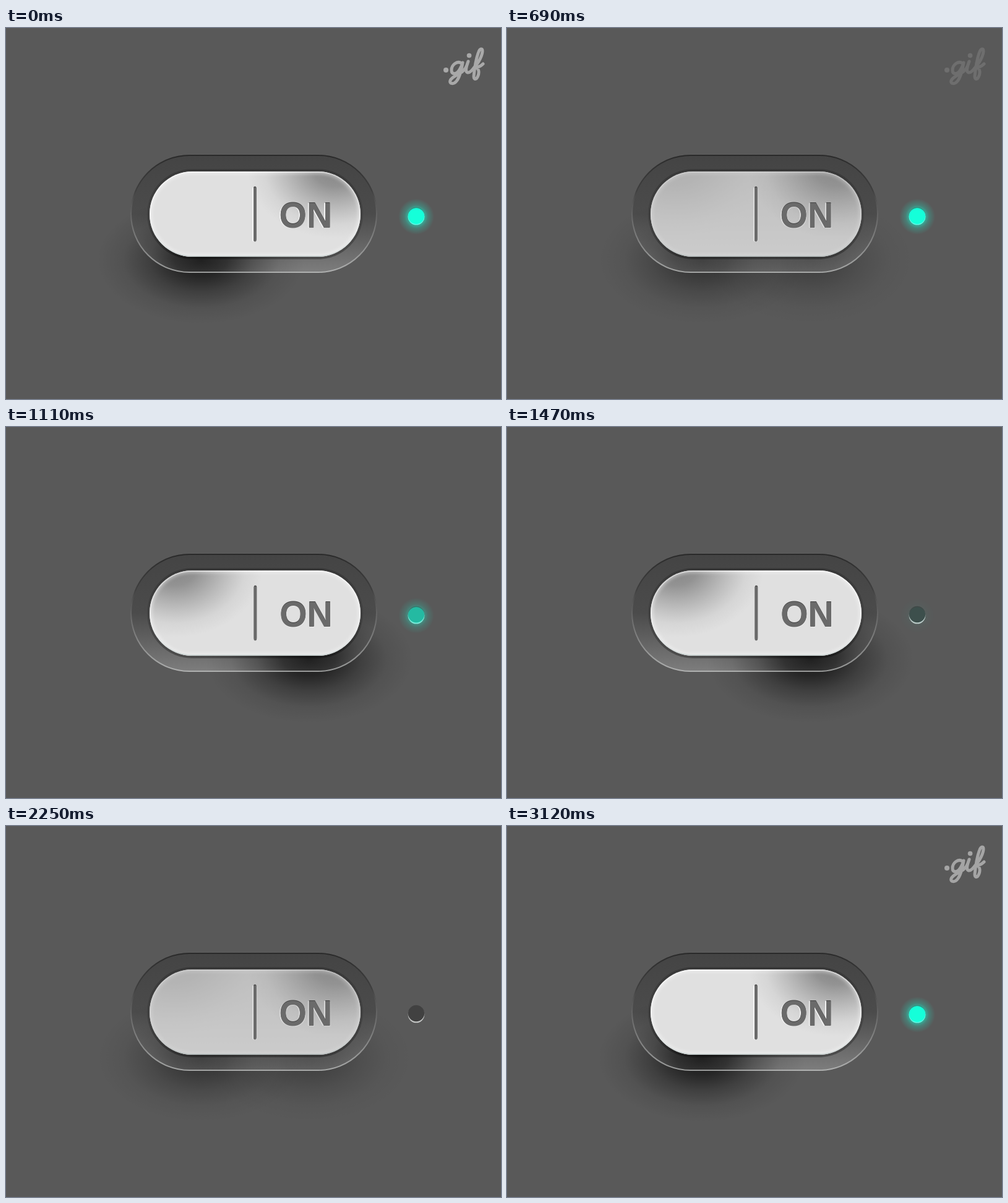
Animation of 800x600 px, one loop 3380 ms. Source, as an HTML page:

```html
<!DOCTYPE html>
<html lang="en">
<head>
<meta charset="utf-8">
<title>Switch</title>
<style>
  html, body { margin: 0; width: 100%; height: 100%; overflow: hidden; background: #595959; }
  svg { display: block; width: 800px; height: 600px; }
  text { font: bold 57px "Liberation Sans", Arial, sans-serif; }
  .script { fill: none; stroke: #fff; stroke-width: 5; stroke-linecap: round; stroke-linejoin: round; }
</style>
</head>
<body>
<svg viewBox="0 0 800 600">
  <defs>
    <linearGradient id="shelf" x2="0" y2="1">
      <stop offset="0" stop-color="#444"/>
      <stop offset=".5" stop-color="#4b4b4b"/>
      <stop offset=".72" stop-color="#606060"/>
      <stop offset="1" stop-color="#7e7e7e"/>
    </linearGradient>
    <linearGradient id="rim" x2="0" y2="1">
      <stop offset="0" stop-color="#2a2a2a"/>
      <stop offset=".3" stop-color="#383838" stop-opacity=".6"/>
      <stop offset=".5" stop-color="#888" stop-opacity=".4"/>
      <stop offset="1" stop-color="#c4c6c5" stop-opacity=".72"/>
    </linearGradient>
    <linearGradient id="well" x2="0" y2="1">
      <stop offset="0" stop-color="#383838"/>
      <stop offset="1" stop-color="#4c4c4c"/>
    </linearGradient>
    <linearGradient id="base" x2="0" y2="1">
      <stop offset="0" stop-color="#5a5a5a"/>
      <stop offset="1" stop-color="#8a8a8a"/>
    </linearGradient>
    <linearGradient id="bevel" x2="0" y2="1">
      <stop offset="0" stop-color="#fff" stop-opacity=".45"/>
      <stop offset=".5" stop-color="#fff" stop-opacity=".35"/>
      <stop offset="1" stop-color="#c6d0cf" stop-opacity=".8"/>
    </linearGradient>
    <radialGradient id="dark" gradientUnits="userSpaceOnUse" cx="0" cy="0" r="1"
      gradientTransform="translate(532 228) scale(142 112)">
      <stop offset="0" stop-color="#858585"/>
      <stop offset=".25" stop-color="#858585" stop-opacity=".85"/>
      <stop offset=".55" stop-color="#8a8a8a" stop-opacity=".45"/>
      <stop offset=".8" stop-color="#909090" stop-opacity=".13"/>
      <stop offset="1" stop-color="#909090" stop-opacity="0"/>
    </radialGradient>
    <radialGradient id="shade">
      <stop offset="0" stop-opacity=".72"/>
      <stop offset=".25" stop-opacity=".58"/>
      <stop offset=".5" stop-opacity=".29"/>
      <stop offset=".75" stop-opacity=".08"/>
      <stop offset="1" stop-opacity="0"/>
    </radialGradient>
    <radialGradient id="halo">
      <stop offset=".42" stop-color="#14ffd9" stop-opacity=".55"/>
      <stop offset=".65" stop-color="#14ffd9" stop-opacity=".22"/>
      <stop offset="1" stop-color="#14ffd9" stop-opacity="0"/>
    </radialGradient>
    <filter id="soft"><feGaussianBlur stdDeviation="2.5"/></filter>
    <clipPath id="pill"><rect x="232" y="232" width="341" height="138" rx="69"/></clipPath>
    <ellipse id="shadow" cx="315" cy="375" rx="168" ry="104" fill="url(#shade)"/>
    <g id="face" clip-path="url(#pill)">
      <rect x="232" y="232" width="341" height="138" fill="#e0e0e0"/>
      <rect x="232" y="232" width="341" height="138" fill="url(#dark)"/>
      <rect x="232" y="232" width="341" height="138" rx="69" fill="none"
        stroke="#fff" stroke-opacity=".4" stroke-width="8" filter="url(#soft)"/>
      <rect x="233" y="233" width="339" height="136" rx="68" fill="none"
        stroke="url(#bevel)" stroke-width="2"/>
    </g>
    <g id="marks">
      <rect x="400" y="257" width="4.6" height="88" rx="2.2"/>
      <text x="441.6" y="322.5">ON</text>
    </g>
  </defs>

  <rect width="800" height="600" fill="#595959"/>
  <rect x="201" y="205" width="399" height="191" rx="95.5" fill="url(#shelf)"/>
  <rect x="228" y="228" width="349" height="146" rx="73" fill="url(#well)"/>
  <use class="right" href="#shadow" transform="matrix(-1 0 0 1 805 0)"/>
  <use class="left" href="#shadow"/>
  <rect x="202" y="206" width="397" height="189" rx="94.5" fill="none" stroke="url(#rim)" stroke-width="2"/>

  <rect x="232" y="232" width="341" height="138" rx="69" fill="url(#base)"/>
  <use class="right" href="#face" transform="matrix(-1 0 0 1 805 0)"/>
  <use class="left" href="#face"/>
  <use class="right" href="#marks" x="1" y="1" fill="#f2f2f2"/>
  <use class="left" href="#marks" x="-1.6" y=".6" fill="#fafafa"/>
  <g id="engraving">
    <use href="#marks" y="-.8" fill="#404040"/>
    <use href="#marks" y=".4" fill="#6a6a6a"/>
  </g>

  <circle cx="663" cy="305" r="13.3" fill="#c6c8c7"/>
  <circle cx="663" cy="303" r="13.2" fill="#414141"/>
  <g id="led">
    <circle cx="663" cy="305" r="29" fill="url(#halo)"/>
    <circle cx="663" cy="305" r="13.3" fill="#62fce6"/>
    <circle cx="663" cy="304.2" r="12.9" fill="#15ffd9"/>
  </g>

  <g id="label" class="script" role="img" aria-label=".gif">
    <path d="M711 68h.1" stroke-width="8"/>
    <path d="M736 57C729 52 720 60 720 68C720 76 728 75 732 69C735 64 737 60 738 56
      C736 68 733 80 728 86C724 91 716 91 718 85C720 79 730 76 737 71C742 67 745 62 747 54
      C744 62 741 72 747 72C751 72 755 66 758 62C764 56 770 44 770 37C770 32 765 33 763 41
      C759 52 757 68 756 78C756 85 761 83 763 77C765 71 764 66 760 64C765 63 768 61 771 58"/>
    <path d="M748.5 44.5h.1" stroke-width="7.5"/>
  </g>
</svg>
<script>
  const LOOP = 3380;

  // [time, value] pairs, linear in between
  const tracks = {
    left: [[600, 1], [690, .6], [750, .6], [960, 0], [2040, 0], [2250, .6], [2310, .6], [2520, 1]],
    right: [[600, 0], [690, .4], [750, .4], [960, 1], [2040, 1], [2250, .4], [2310, .4], [2520, 0]],
    led: [[880, 1], [1500, .03], [1560, 0], [2550, 0], [3120, 1]],
    label: [[0, .48], [940, 0], [2270, 0], [3170, .48]]
  };

  const targets = Object.entries(tracks).map(([name, keys]) =>
    [document.querySelectorAll(`.${name}, #${name}`), keys]);

  function valueAt(keys, t) {
    const next = keys.findIndex(([time]) => time > t);
    if (next < 0) return keys[keys.length - 1][1];
    if (next === 0) return keys[0][1];
    const [t0, v0] = keys[next - 1], [t1, v1] = keys[next];
    return v0 + (v1 - v0) * (t - t0) / (t1 - t0);
  }

  const engraving = document.getElementById('engraving');
  const start = performance.now();

  function draw() {
    const t = (performance.now() - start) % LOOP;
    for (const [nodes, keys] of targets) {
      const v = valueAt(keys, t);
      nodes.forEach(node => { node.style.opacity = v; });
    }
    const shift = 1 - Math.min(1, valueAt(tracks.left, t) / .6);
    engraving.setAttribute('transform', `translate(${shift * .6} 0)`);
    requestAnimationFrame(draw);
  }
  draw();
</script>
</body>
</html>
```
